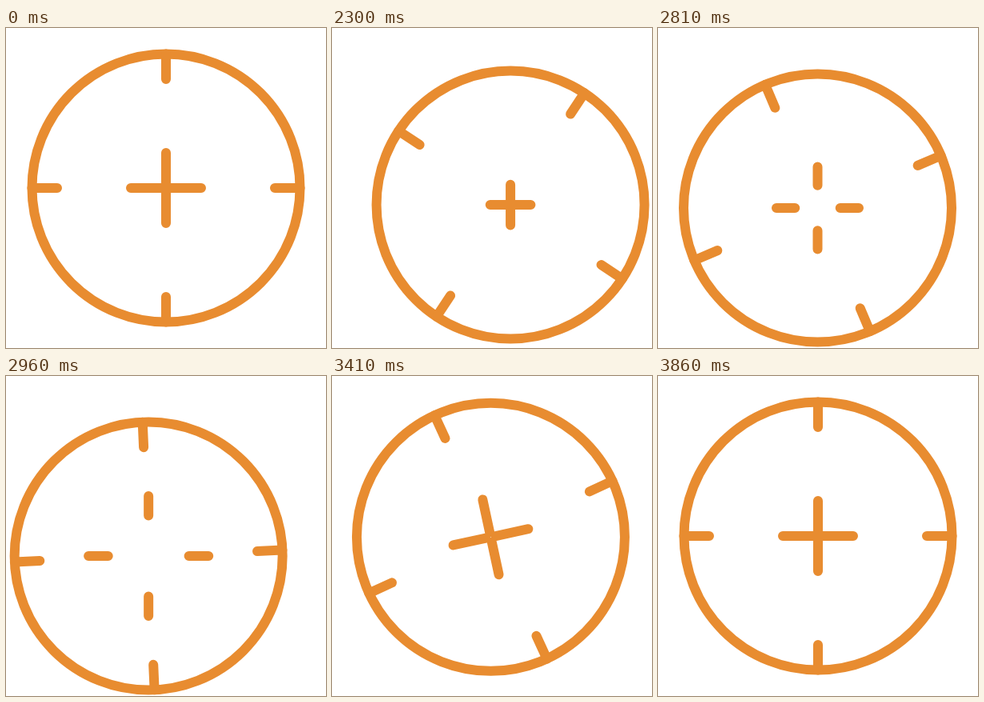
Animation of 400x400 px, one loop 3.89 s. Source, as an HTML page with a canvas:

```html
<!DOCTYPE html>
<html lang="en">
<head>
<meta charset="utf-8">
<title>Crosshair</title>
<style>
  html, body { margin: 0; width: 100%; height: 100%; overflow: hidden; background: #fff; }
  canvas { display: block; width: 400px; height: 400px; }
</style>
</head>
<body>
<canvas id="stage" width="400" height="400"></canvas>
<script>
const LOOP = 3890, REST = 2030, STEP = 30;
const CENTER = 200, RADIUS = 167.5, TICK = 136;
const ctx = document.getElementById('stage').getContext('2d');

// Eased progress from 0 to 1 between two steps
function ease(step, from, to) {
  const u = Math.min(1, Math.max(0, (step - from) / (to - from)));
  return u * u * (3 - 2 * u);
}

// Four strokes pointing out from the centre, a quarter turn apart
function spokes(x, y, degrees, from, to) {
  ctx.beginPath();
  for (let i = 0; i < 4; i++) {
    const a = (degrees + i * 90) * Math.PI / 180;
    const c = Math.cos(a), s = Math.sin(a);
    ctx.moveTo(x + from * c, y + from * s);
    ctx.lineTo(x + to * c, y + to * s);
  }
  ctx.stroke();
}

function draw(time) {
  // The motion is already under way when the rest ends
  const step = time < REST ? -2 : 1 + Math.floor((time - REST) / STEP);

  // Three moves: right and down, across to the left, back home
  const right = ease(step, -1.5, 11);
  const left = ease(step, 20, 34);
  const home = ease(step, 36, 49);
  const x = CENTER + 23.5 * right - 48 * left + 24.5 * home;
  const y = CENTER + 25 * (ease(step, -1.9, 14) - ease(step, 33.6, 49.2));

  const ringTurn = 44 * ease(step, -2, 15.6) + 46 * left + 90 * ease(step, 36, 52.8);
  const crossTurn = 90 * ease(step, 36, 50.3);

  // The cross shrinks, bursts apart, then closes again
  const close = ease(step, 36, 50);
  const armIn = (3.2 * right + 50 * left) * (1 - close);
  const armOut = 44 - 19 * right + 53 * left - 34 * close;

  ctx.fillStyle = '#fff';
  ctx.fillRect(0, 0, 400, 400);
  ctx.strokeStyle = '#e88c30';
  ctx.lineWidth = 12;
  ctx.lineCap = 'round';
  ctx.beginPath();
  ctx.arc(x, y, RADIUS, 0, Math.PI * 2);
  ctx.stroke();
  spokes(x, y, ringTurn, TICK, RADIUS);
  spokes(x, y, crossTurn, armIn, armOut);
}

const start = performance.now();
function tick() {
  draw((performance.now() - start) % LOOP);
  requestAnimationFrame(tick);
}
tick();
</script>
</body>
</html>
```
